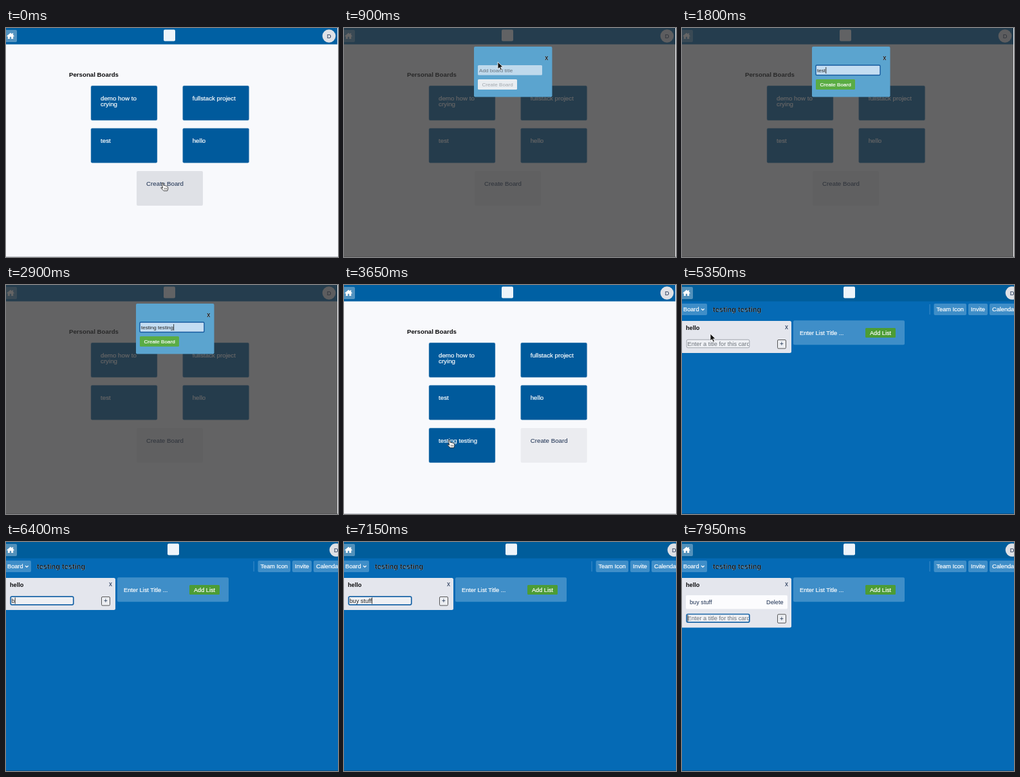
Animation of 516 by 357 pixels, one loop 8 s. Source, as an HTML page:

```html
<!DOCTYPE html>
<html lang="en">
<head>
<meta charset="utf-8">
<title>Boards</title>
<style>
html, body { margin: 0; width: 100%; height: 100%; overflow: hidden; background: #f8f9fc; }
svg { display: block; width: 516px; height: 357px; }
text { font-family: "Liberation Sans", Arial, sans-serif; font-size: 9.2px; fill: #172b4d; white-space: pre; }
.w { fill: #fff; stroke: #fff; stroke-width: .2px; }
.b { font-weight: bold; fill: #0b0b0d; }
.t { font-size: 9.75px; }
.s { font-size: 8.1px; }
.m { text-anchor: middle; }
</style>
</head>
<body>
<svg id="stage" viewBox="0 0 516 357"></svg>
<script>
const LOOP = 8000;
const OPEN = 300, CLOSE = 3150, ENTER = 3800, LIST = 5300, CARD = 7250;
const stage = document.getElementById('stage');

const rect = (x, y, w, h, fill, more = '') =>
  `<rect x="${x}" y="${y}" width="${w}" height="${h}" fill="${fill}" ${more}/>`;
const text = (x, y, str, cls = '', more = '') =>
  `<text x="${x}" y="${y}" class="${cls}" ${more}>${str}</text>`;
const group = (id, body, more = '') => `<g id="${id}" ${more}>${body}</g>`;
const caret = id => rect(0, 0, .9, 10, '#222', `id="${id}"`);

const header = (w, fill, logoX, userX) =>
  rect(0, 0, w, 25.5, fill) +
  rect(-4, 3, 21, 19, '#fff', 'fill-opacity=".32" rx="2"') +
  '<path d="M1.2 12.6 7 7.4l2.6 2.3V8h1.5v3l1.7 1.6-.8.9-.8-.7V17H8.2v-3.2H5.8V17H2.9v-4.2l-.9.7z" fill="#fff"/>' +
  rect(logoX - 9, 2.5, 18, 18, '#eef4fa', 'rx="2"') +
  `<circle cx="${userX}" cy="12.5" r="10.3" fill="#dfe1e6"/>` +
  text(userX, 16, 'D', 'm');

const tile = (x, y, lines) =>
  rect(x, y, 103, 54, '#005a9c', 'rx="2" stroke="#7fa9cc" stroke-width=".5"') +
  lines.map((s, i) => text(x + 15, y + 22.5 + i * 9, s, 't w')).join('');

const pill = (x, w, label) =>
  rect(x, 29, w, 18, '#3f8ec8', 'rx="2"') + text(x + 4, 41.3, label, 'w');

const home =
  rect(0, 0, 516, 357, '#f8f9fc') + header(515, '#0060a3', 254, 502) +
  text(98, 75.8, 'Personal Boards', 'b', 'style="font-size:9.7px"') +
  tile(132, 90, ['demo how to', 'crying']) + tile(274.7, 90, ['fullstack project']) +
  tile(132, 156.3, ['test']) + tile(274.7, 156.3, ['hello']) +
  group('made', tile(132, 223, ['testing testing'])) +
  group('create', rect(0, 223, 103, 54, '#ebecf0', 'id="createBg" rx="2"') +
    text(15, 245.6, 'Create Board', 't')) +
  rect(0, 356, 516, 1, '#c3c7cc');

const modal =
  rect(0, 0, 515, 357, '#323232', 'fill-opacity=".75"') +
  rect(202, 29, 121.5, 78.5, '#5ba4cf', 'rx="2"') +
  text(312, 49.5, 'x', 'b w', 'style="font-size:10px"') +
  rect(208, 58, 100, 15.5, '#bfd9ec', 'id="nameBox" rx="1.5"') +
  text(210, 69, '', 's', 'id="name"') + caret('nameCaret') +
  rect(208, 80, 61, 16, '#5aac44', 'id="okBg" rx="1.5"') +
  text(214.5, 91, 'Create Board', 's', 'id="ok"');

const newList =
  rect(-3, 55.3, 173, 38, '#3f8ec8', 'rx="2"') +
  text(7, 78, '', 'w', 'id="title"') + caret('titleCaret') +
  rect(109, 67, 47, 15, '#4c9c35', 'rx="1.5"') +
  text(132.5, 77.8, 'Add List', 'w m');

const list =
  rect(-3, 56, 173, 50, '#e4e6ed', 'id="listBg" rx="2.5"') +
  text(6, 69.5, 'hello', 'b') + text(160, 68.5, 'x', '', 'style="font-size:10px"') +
  group('card', rect(6, 83, 158, 21.5, '#fcfcfe', 'rx="2"') +
    text(12, 97, 'buy stuff') + text(131, 97, 'Delete')) +
  group('entry',
    rect(7.2, 85.2, 97.6, 12.6, '#eef0f4', 'id="entryBox" rx="2"') +
    text(8.5, 95, '', '', 'id="item" clip-path="url(#entryClip)"') + caret('itemCaret') +
    rect(148.5, 85.5, 13, 13.5, '#eceef2', 'rx="1.5" stroke="#444" stroke-width=".9"') +
    text(155, 95.3, '+', 'm', 'style="font-size:10px"'));

const board =
  rect(0, 0, 516, 357, '#056ab5') + header(516, '#005d9b', 260, 513) +
  rect(-3, 29, 42, 18, '#3f8ec8', 'rx="2"') + text(2, 41.3, 'Board', 'w') +
  '<path d="M30 37l2.3 2.2L34.6 37" fill="none" stroke="#fff" stroke-width="1.3"/>' +
  text(48, 42, 'testing testing', 'b w', 'style="font-size:11px"') +
  rect(384.6, 30, 1, 16, '#3f8ec8') +
  pill(391.5, 50.5, 'Team Icon') + pill(445, 30, 'Invite') + pill(478, 48, 'Calendar') +
  group('list', list) + group('newList', newList) +
  rect(0, 356, 516, 1, '#0a4f86');

const line = 'fill="#fff" stroke="#111" stroke-width=".8" stroke-linejoin="round"';
const pointers =
  group('arrow', '<path d="M0 0v11l2.6-2.3 1.8 4.1 2-.9-1.8-4h3.6z" fill="#111" stroke="#fff" stroke-width=".8"/>') +
  group('hand', `<path d="M-.8.8Q0-.6 1 .8l1.2 4 1-.5 1 .8 1-.4 1 .9 1.2-.2.9 1.2.5 3-1 3.2H2.3L-2 8.7q-.7-1.4 1-1l1.6 1z" ${line}/><path d="M3.3 8v3M5 8v3M6.6 8v3" stroke="#333" stroke-width=".6"/>`) +
  group('beam', '<path d="M-2-5q2 0 2 1.2Q0-5 2-5M0-4V4M-2 5q2 0 2-1.2Q0 5 2 5" fill="none" stroke="#222" stroke-width=".9"/>');

stage.innerHTML =
  '<defs><clipPath id="entryClip"><rect x="8" y="84" width="96" height="14"/></clipPath></defs>' +
  group('home', home) + group('modal', modal) + group('board', board) + group('pointer', pointers);

const el = {};
stage.querySelectorAll('[id]').forEach(n => el[n.id] = n);
const show = (id, on) => { el[id].style.display = on ? '' : 'none'; };
const set = (id, attrs) => { for (const k in attrs) el[id].setAttribute(k, attrs[k]); };
const shift = (id, x, y) => set(id, { transform: `translate(${x} ${y})` });

// time, x, y
const path = [
  [0, 243, 241], [250, 243, 241], [800, 239, 53], [1000, 239, 53], [1250, 236, 66],
  [3150, 236, 66], [3550, 163, 241], [3830, 163, 241], [4080, 44, 81], [4200, 44, 81],
  [4320, 44, 76], [5350, 44, 76], [5750, 42, 93], [8000, 42, 93]
];
const within = (t, a, b) => t >= a && t < b;

function pointerAt(t) {
  let i = 0;
  while (i < path.length - 2 && t >= path[i + 1][0]) i++;
  const [a, x, y] = path[i], [b, u, v] = path[i + 1];
  const k = Math.min(1, (t - a) / (b - a)), e = k * k * (3 - 2 * k);
  return [x + (u - x) * e, y + (v - y) * e];
}

const typed = (str, t, start, step) =>
  str.slice(0, Math.max(0, Math.floor((t - start) / step) + 1));

function field(id, value, hint, focused, x, y, blinkOn) {
  el[id].textContent = value || hint;
  show(id + 'Caret', focused && blinkOn);
  if (!focused) return;
  el[id].textContent = value;
  const w = value ? el[id].getComputedTextLength() : 0;
  set(id + 'Caret', { x: x + w + .3, y });
  el[id].textContent = value || hint;
}

function render(t) {
  const onBoard = t >= ENTER, inModal = within(t, OPEN, CLOSE);
  show('home', !onBoard);
  show('modal', inModal);
  show('board', onBoard);

  if (!onBoard) {
    const made = t >= CLOSE;
    show('made', made);
    shift('create', made ? 274.7 : 203, 0);
    set('createBg', { fill: t < OPEN ? '#dfe1e6' : '#ebecf0' });
  }

  if (inModal) {
    const name = typed('testing testing', t, 1500, 82), focus = t >= 1250;
    set('nameBox', {
      fill: focus ? '#c4ddf2' : '#bfd9ec',
      stroke: focus ? '#155a9e' : 'none', 'stroke-width': 1.4
    });
    field('name', name, 'Add board title', focus, 210, 61, name ? true : t % 1000 < 600);
    el.name.style.fill = name ? '#222' : '#66737f';
    set('okBg', { fill: name ? '#5aac44' : '#e9edf1' });
    set('ok', { class: name ? 's w' : 's' });
    el.ok.style.fill = name ? '#fff' : '#a2a7ad';
  }

  if (onBoard) {
    const hasList = t >= LIST, hasCard = t >= CARD;
    show('list', hasList);
    shift('newList', hasList ? 176 : 0, 0);
    const title = hasList ? '' : typed('hello', t, 4550, 120);
    field('title', title, 'Enter List Title ...', within(t, 4350, LIST), 7, 69.5, true);
    set('titleCaret', { fill: '#fff' });

    show('card', hasCard);
    set('listBg', { height: hasCard ? 77.5 : 50 });
    shift('entry', 0, hasCard ? 27.3 : 0);
    const item = hasCard ? '' : typed('buy stuff', t, 6350, 82), focus = t >= 5850;
    set('entryBox', {
      stroke: focus ? '#1763a6' : '#8d939c', 'stroke-width': focus ? 1.7 : .8
    });
    field('item', item, 'Enter a title for this card', focus, 8.3, 86.5, true);
    el.item.style.fill = item ? '#222' : '#6d737b';
  }

  const [x, y] = pointerAt(t);
  const beam = within(t, 1130, 1500) || within(t, 4250, 4550) || within(t, 5650, 6300);
  const hand = t < OPEN + 50 || within(t, 3420, ENTER + 30);
  shift('pointer', x.toFixed(2), y.toFixed(2));
  show('pointer', !(within(t, 1500, CLOSE) || within(t, 4550, LIST + 50) || t >= 6300));
  show('beam', beam);
  show('hand', hand);
  show('arrow', !beam && !hand);
}

const start = performance.now();
function tick() {
  render((performance.now() - start) % LOOP);
  requestAnimationFrame(tick);
}
render(0);
requestAnimationFrame(tick);
</script>
</body>
</html>
```
